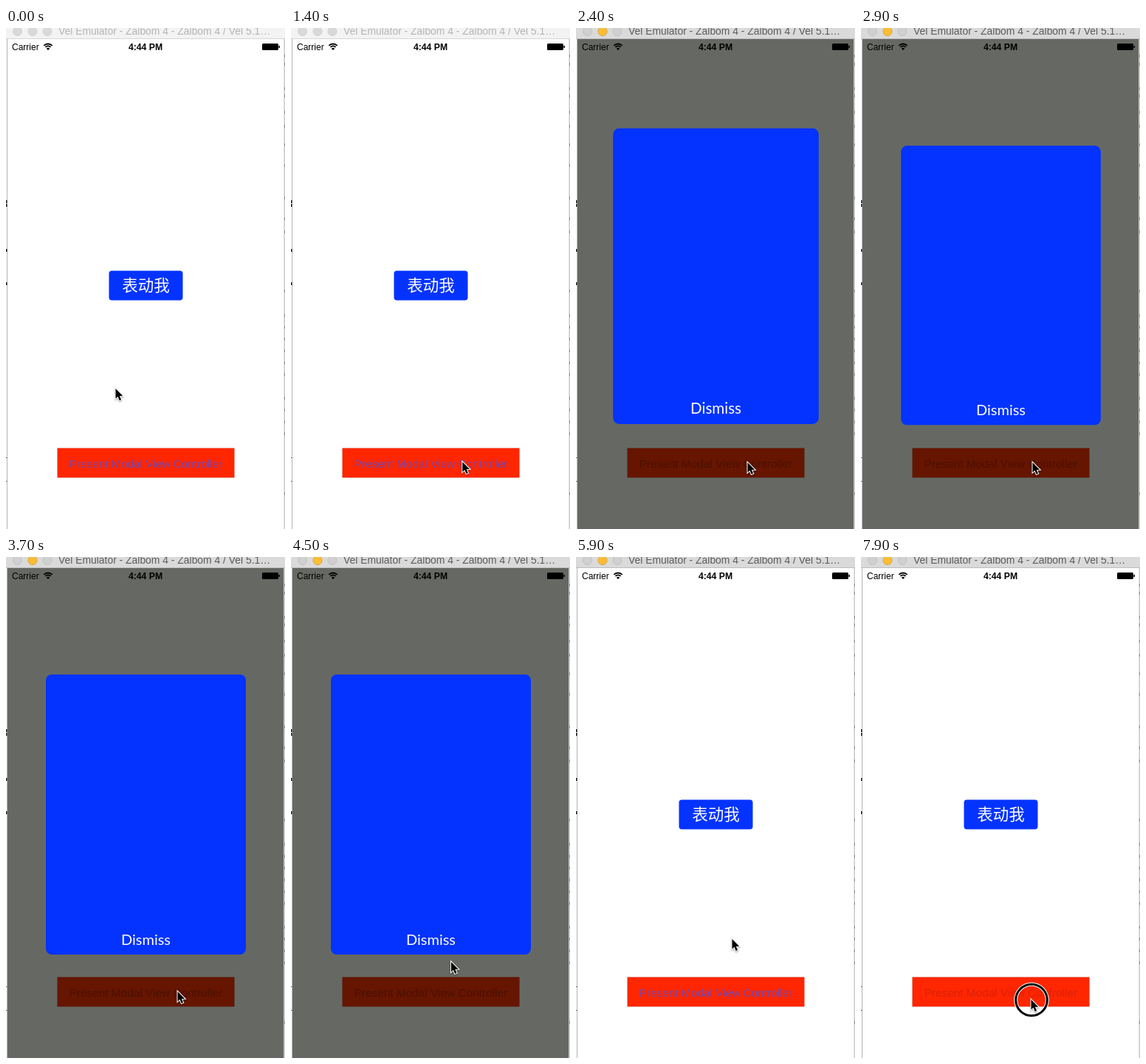
Animation of 378x678 px, one loop 8 s. Source, as an HTML page with a canvas:

```html
<!DOCTYPE html>
<html lang="en">
<head>
<meta charset="utf-8">
<style>
html, body { margin: 0; width: 100%; height: 100%; overflow: hidden; background: #fff; }
canvas { display: block; }
</style>
</head>
<body>
<canvas id="stage" width="378" height="678"></canvas>
<script>
const ctx = document.getElementById('stage').getContext('2d');
const LOOP = 8000, PRESS = 1900, OPEN = 2038, DISMISS = 5320, LEAVE = 400, FADE = 350;
const BLUE = '#0433ff', SANS = '"Liberation Sans", Arial, sans-serif';
const CENTER = 348.5, HIDDEN = -318.5;

// time, x, y of the pointer tip
const path = [
  [100, 148.5, 488], [900, 230, 578], [1500, 232.5, 588], [3800, 232.5, 588],
  [4500, 217, 548], [5000, 211.5, 517], [6200, 211.5, 517], [7100, 230.5, 599]
];
// intervals in which the mouse button is held
const presses = [[1890, 2030], [5090, 5290], [7200, LOOP]];

const clamp = v => Math.max(0, Math.min(1, v));
const mix = (a, b, p) => a + (b - a) * p;
const smooth = p => p * p * (3 - 2 * p);
const within = (t, a, b) => t >= a && t < b;

// cubic-bezier(.25, .1, .25, 1)
function ease(x) {
  x = clamp(x);
  const curve = (a, b, s) => 3 * a * s * (1 - s) ** 2 + 3 * b * s * s * (1 - s) + s ** 3;
  let lo = 0, hi = 1;
  for (let i = 0; i < 20; i++) {
    const mid = (lo + hi) / 2;
    if (curve(.25, .25, mid) < x) lo = mid; else hi = mid;
  }
  return curve(.1, 1, lo);
}

// remaining distance of a damped spring, 1 at the start
function spring(ms, tension, friction) {
  const s = Math.max(0, ms) / 1000, decay = friction / 2;
  const w = Math.sqrt(tension - decay * decay);
  return Math.exp(-decay * s) * (Math.cos(w * s) + decay / w * Math.sin(w * s));
}

function rect(x, y, w, h, color) {
  ctx.fillStyle = color;
  ctx.fillRect(x, y, w, h);
}

function round(x, y, w, h, r, color) {
  ctx.fillStyle = color;
  ctx.beginPath();
  ctx.roundRect(x, y, w, h, r);
  ctx.fill();
}

function text(str, x, y, font, color, align = 'left') {
  ctx.font = font;
  ctx.fillStyle = color;
  ctx.textAlign = align;
  ctx.fillText(str, x, y);
}

function ring(x, y, r, width, color) {
  ctx.beginPath();
  ctx.arc(x, y, r, 0, 7);
  ctx.lineWidth = width;
  ctx.strokeStyle = color;
  ctx.stroke();
}

function titleBar(active) {
  rect(0, 0, 378, 14, active ? '#dadada' : '#f3f3f3');
  rect(0, 14, 378, 1, active ? '#bdbdbd' : '#d6d6d6');
  [15.5, 36, 56].forEach((x, i) => {
    const lit = active && i === 1;
    ctx.beginPath();
    ctx.arc(x, 4.5, 6, 0, 7);
    ctx.fillStyle = lit ? '#fdbe36' : active ? '#d0d0d0' : '#d9d9d9';
    ctx.fill();
    ring(x, 4.5, 6, 1, lit ? '#dfa02c' : active ? '#c0c0c0' : '#d2d2d2');
  });
  text('Vel Emulator - Zalbom 4 - Zalbom 4 / Vel 5.1…', 71, 9, '13.9px ' + SANS, active ? '#5c5c5c' : '#b4b4b4');
}

function statusBar() {
  text('Carrier', 8, 29.5, '12px ' + SANS, '#000');
  text('4:44 PM', 189, 29.5, 'bold 12.2px ' + SANS, '#000', 'center');
  for (const r of [8, 5]) {
    ctx.beginPath();
    ctx.arc(57, 29.5, r, -2.36, -.78);
    ctx.lineWidth = 1.8;
    ctx.strokeStyle = '#000';
    ctx.stroke();
  }
  ctx.beginPath();
  ctx.moveTo(57, 30);
  ctx.arc(57, 30, 3, -2.36, -.78);
  ctx.fillStyle = '#000';
  ctx.fill();
  round(347, 21, 22, 9, 1.5, '#000');
  rect(369.5, 24, 1.5, 3, '#000');
}

// slivers of the windows behind
function edges() {
  rect(0, 15, 1, 663, '#fff');
  rect(1, 15, 1, 663, '#b4b4b4');
  rect(376.5, 15, 1.5, 663, '#c9c9c9');
  for (const y of [233, 238, 299, 344]) rect(0, y, 1.5, 4, '#222');
  for (const y of [581, 613]) rect(0, y, 1.5, 1, '#555');
  for (const y of [36, 47, 80, 90, 112, 131, 156, 184, 228, 256, 274, 354, 387, 403, 419, 435, 451, 467, 499, 515, 531, 547, 628])
    rect(377, y, 1, 4, '#888');
}

function modal(t) {
  if (!within(t, OPEN, DISMISS + LEAVE)) return;
  const age = t - OPEN;
  const stretch = spring(age, 342, 11);
  let y = mix(CENTER, HIDDEN, spring(age, 342, 18.9));
  if (t > DISMISS) y = mix(CENTER, HIDDEN, ease((t - DISMISS) / LEAVE));
  ctx.save();
  ctx.beginPath();
  ctx.rect(2, 15, 374.5, 663);
  ctx.clip();
  ctx.translate(189.5, y);
  ctx.scale(1 + .2 * stretch, 1 + .4 * stretch);
  round(-135.5, -189.5, 271, 379, 8, BLUE);
  ctx.globalAlpha = t < 5100 ? 1 : clamp((t - DISMISS) / 280);
  text('Dismiss', 0, 176.5, '20px Lato, sans-serif', '#fff', 'center');
  ctx.restore();
}

function pointer(t) {
  let i = 0;
  while (i < path.length - 2 && t > path[i + 1][0]) i++;
  const [t0, x0, y0] = path[i], [t1, x1, y1] = path[i + 1];
  const p = smooth(clamp((t - t0) / (t1 - t0)));
  const x = mix(x0, x1, p), y = mix(y0, y1, p);
  if (presses.some(([a, b]) => within(t, a, b))) {
    ring(x + .5, y + .5, 21.3, 5, '#fff');
    ring(x + .5, y + .5, 21.3, 3, '#000');
  }
  ctx.save();
  ctx.translate(x, y);
  ctx.beginPath();
  for (const [px, py] of [[0, 0], [0, 13.5], [3, 10.8], [5.2, 16], [7.6, 15], [5.4, 9.9], [9.7, 9.7]]) ctx.lineTo(px, py);
  ctx.closePath();
  ctx.shadowColor = 'rgba(0,0,0,.4)';
  ctx.shadowBlur = 2;
  ctx.shadowOffsetY = 1;
  ctx.lineWidth = 2;
  ctx.strokeStyle = '#fff';
  ctx.stroke();
  ctx.shadowColor = 'transparent';
  ctx.fillStyle = '#000';
  ctx.fill();
  ctx.restore();
}

function draw(now) {
  const t = now % LOOP;
  const dim = .61 * (ease((t - OPEN) / FADE) - ease((t - DISMISS) / LEAVE));
  const pressed = t >= 7250, dull = within(t, PRESS, 5600);

  rect(0, 0, 378, 678, '#fff');
  rect(69.5, 568.5, 240, 40, '#d42000');
  rect(70, 569, 239, 39, '#ff2600');
  text('Present Modal View Controller', 85.5, 594.5, '15.4px ' + SANS,
    pressed ? '#d9220a' : dull ? '#b81804' : '#7a44a8');
  rect(2, 15, 374.5, 663, `rgba(6,10,0,${dim})`);

  const shade = Math.round(255 * (1 - dim));
  round(139.5, 328.5, 100, 40, 4, BLUE);
  text('表动我', 189.5, 355.5, '21.5px "Noto Sans CJK SC", "Noto Sans CJK", sans-serif',
    `rgb(${shade},${shade},${shade})`, 'center');

  edges();
  statusBar();
  modal(t);
  titleBar(t >= PRESS);
  pointer(t);
}

const start = performance.now();
function tick() {
  draw(performance.now() - start);
  requestAnimationFrame(tick);
}
tick();
</script>
</body>
</html>
```
